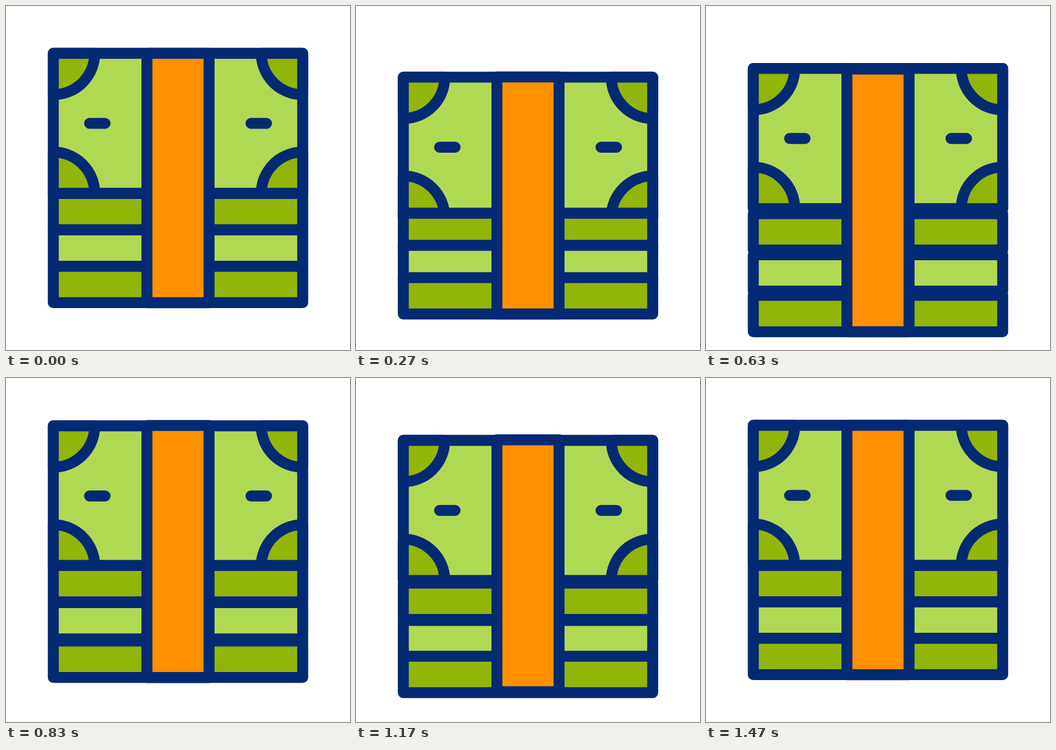
An HTML page that plays this animation: 640 by 640 pixels, repeating every 2000 ms.

```html
<!DOCTYPE html>
<html lang="en">
<head>
<meta charset="utf-8">
<title>Stack of banknotes</title>
<style>
  html, body { margin: 0; width: 100%; height: 100%; overflow: hidden; background: #fff; }
  svg { display: block; width: 100%; height: 100%; }
  .line { stroke: #042a74; stroke-width: 20.4; stroke-linecap: round; stroke-linejoin: round; }
  .light { fill: #b0d953; }
  .dark { fill: #91b508; }
  .band { fill: #ff9000; }
  .dash { fill: none; }
</style>
</head>
<body>
<svg viewBox="0 0 640 640">
  <g id="bill" class="line">
    <rect class="light" x="88" y="88" width="464" height="260.8"/>
    <g class="dark">
      <path d="M88 88H165A77 77 0 0 1 88 165Z"/>
      <path d="M552 88H475A77 77 0 0 0 552 165Z"/>
      <path d="M88 348.8H165A77 77 0 0 0 88 271.8Z"/>
      <path d="M552 348.8H475A77 77 0 0 1 552 271.8Z"/>
    </g>
    <path class="dash" d="M155.5 218.4H184.3M455.8 218.4H484.7"/>
  </g>
  <rect id="strip1" class="line dark" x="88" y="348.8" width="464" height="67.7"/>
  <rect id="strip2" class="line light" x="88" y="416.5" width="464" height="67.7"/>
  <rect id="strip3" class="line dark" x="88" y="484.2" width="464" height="67.7"/>
  <rect id="band" class="line band" x="262.2" y="88" width="115.6" height="464"/>
</svg>
<script>
  const LOOP = 2000, STEP = 100 / 3;

  // [step, vertical offset]; each leg is eased with a half cosine
  const bounce = [[0, 0], [13, 65.5], [24, 0], [33, 34.5], [40, 0]];
  const bandTop = [[0, 0], [13, 65], [24.3, -0.2], [33, 33.5], [40, -1], [44, 0]];
  const bandEnd = [[3, 0], [16, 65.2], [27, 0], [36, 32.6], [43, 0]];

  const layers = ['bill', 'strip1', 'strip2', 'strip3'].map(id => document.getElementById(id));
  const band = document.getElementById('band');

  function offset(keys, n) {
    if (n <= keys[0][0]) return keys[0][1];
    for (let i = 1; i < keys.length; i++) {
      const [a, from] = keys[i - 1], [b, to] = keys[i];
      if (n < b) return from + (to - from) * (1 - Math.cos(Math.PI * (n - a) / (b - a))) / 2;
    }
    return keys[keys.length - 1][1];
  }

  function draw(ms) {
    // 30 steps a second, each starting on a 10 ms tick
    const n = Math.floor((Math.floor(ms / 10) * 10 + 3.4) / STEP);
    layers.forEach((el, lag) => {
      el.setAttribute('transform', `translate(0 ${offset(bounce, n - lag).toFixed(3)})`);
    });
    const top = 88 + offset(bandTop, n), end = 552 + offset(bandEnd, n);
    band.setAttribute('y', top);
    band.setAttribute('height', end - top);
  }

  const start = performance.now();
  function tick() {
    draw((performance.now() - start) % LOOP);
    requestAnimationFrame(tick);
  }
  tick();
</script>
</body>
</html>
```
